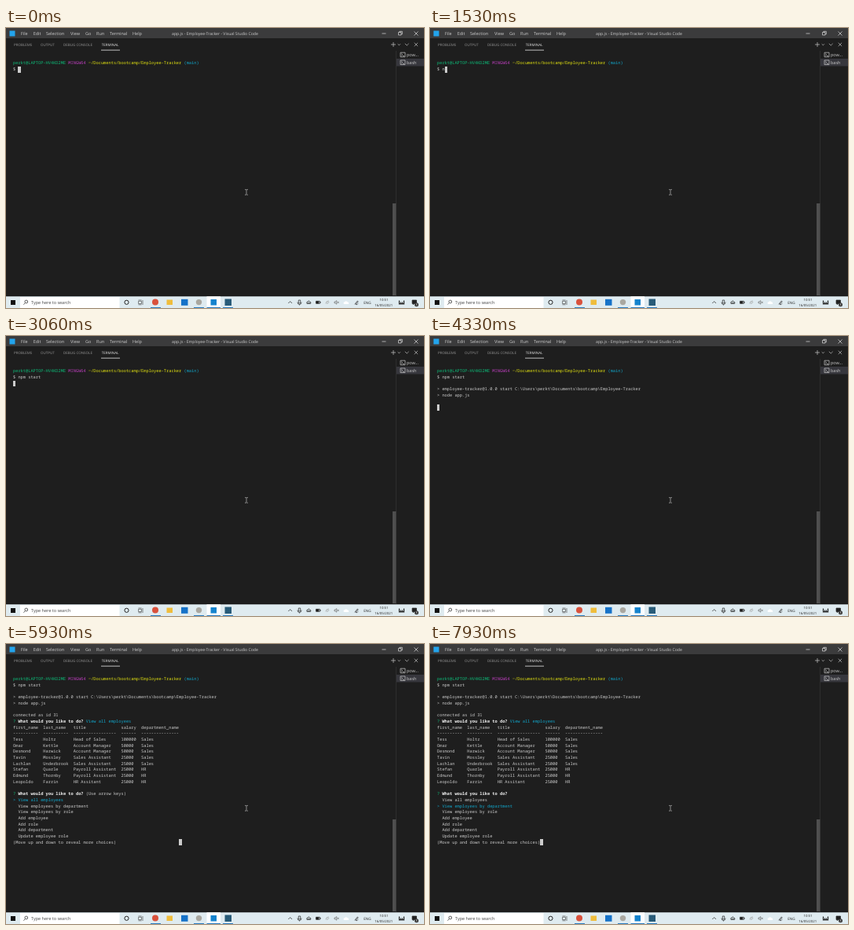
An HTML page for the animation above (8 s loop, 532 by 356 pixels).

```html
<!DOCTYPE html>
<html lang="en">
<head>
<meta charset="utf-8">
<title>Terminal</title>
<style>
html, body { margin: 0; width: 532px; height: 356px; overflow: hidden; background: #1e1e1e; text-rendering: geometricPrecision; }
svg { position: absolute; left: 0; top: 0; font: 5.5px "Open Sans", "Noto Sans", sans-serif; }
pre { position: absolute; left: 9px; top: 41.4px; margin: 0; font: 5.333px/7.667px "Noto Sans Mono", "Liberation Mono", monospace; color: #ccc; }
pre b { color: #f2f2f2; }
.green { color: #0dbc79; }
.purple { color: #bc3fbc; }
.yellow { color: #e5e510; }
.cyan { color: #11a8cd; }
#cursor { position: absolute; width: 3.4px; height: 7.6px; background: #ccc; }
.line { fill: none; stroke-width: .7; }
.tabs { font-size: 4.5px; fill: #969696; }
</style>
</head>
<body>
<svg width="532" height="356" viewBox="0 0 532 356">
  <!-- title bar -->
  <path fill="#3b3b3c" d="M0 0h532v13H0z"/>
  <path fill="#23a4ec" d="M4.5 3.5h7v7h-7z"/>
  <g id="menu" fill="#ccc"></g>
  <text x="266" y="8.9" text-anchor="middle" font-size="5.15" fill="#ccc">app.js - Employee-Tracker - Visual Studio Code</text>
  <path class="line" stroke="#ddd" d="M478.5 7h5M499.5 5.5h3.5v3.5h-3.5zM500.8 5.5v-1.2h3.5v3.5h-1.2M519.5 4.5l5 5m0-5l-5 5"/>
  <!-- panel header -->
  <g id="tabs" class="tabs"></g>
  <path fill="#e7e7e7" d="M121 27.7h24v.8h-24z"/>
  <path class="line" stroke="#c5c5c5" d="M490 21h6M493 18v6M498.7 20.3l1.6 1.6 1.6-1.6M507.8 19.8l2.4 2.4 2.4-2.4M519.7 18.8l4.4 4.4m0-4.4l-4.4 4.4"/>
  <!-- terminal list -->
  <path fill="#37373d" d="M497 39h35v9.6h-35z"/>
  <path fill="#3a3a3a" d="M496.3 29h.6v312h-.6z"/>
  <path fill="#4f4f4f" d="M492 223h4.4v117h-4.4z"/>
  <path class="line" stroke="#ccc" d="M502 31.2h6v5.6h-6zM503.2 32.6l1.5 1.4-1.5 1.4M505 35.6h2M502 41h6v5.6h-6zM503.2 42.4l1.5 1.4-1.5 1.4M505 45.4h2"/>
  <g fill="#ccc"><text x="510" y="36">pow...</text><text x="510" y="45.8">bash</text></g>
  <!-- mouse pointer -->
  <path class="line" stroke="#bbb" d="M304 205.4h1.4l.6.6.6-.6h1.4M306 206v5.5M304 212.1h1.4l.6-.6.6.6h1.4"/>
  <!-- taskbar -->
  <path fill="#dfebf0" d="M0 341.3h532V356H0z"/>
  <path fill="#fff" d="M18 342h126.5v14H18zM255.5 341.3h17.5V356h-17.5z"/>
  <path fill="#111" d="M6 346h6v6H6z"/>
  <g class="line" stroke="#222">
    <circle cx="25.8" cy="348" r="1.9"/><path d="M24.4 349.5l-2 2.2"/>
    <circle cx="153.5" cy="348.8" r="2.6" stroke-width="1"/>
    <path d="M168.5 347.3h4v3.2h-4zM168.5 346h4M168.5 351.8h4M174 346v6" stroke="#555"/>
    <path d="M359.3 350l2.4-2.4 2.4 2.4"/>
    <path d="M372.3 346h2.4v4h-2.4zM371 348.5q0 3 2.5 3t2.5-3M373.5 351.5v1"/>
    <path d="M383 350.5q-1-2.5 1-2.5 1-2.5 2.8 0 2 .5.8 2.5zM383.5 349.2h4"/>
    <path d="M394.5 347.3h5v3h-5zM400.3 348v1.6"/><path fill="#222" d="M395 347.6h3v2.4h-3z"/>
    <path stroke="#999" d="M407 350.5q0-3.5 4-3.5M408.7 351q0-2.3 2.6-2.3"/>
    <path stroke="#666" d="M418 348h1.2l1.6-1.4v4.6l-1.6-1.4H418zM421.8 347.8l1.7 2m0-2l-1.7 2"/>
    <path d="M443.8 351.3l3.5-4.3 1 .8-3.2 3.6q2 1 3-1"/>
    <path stroke-width="1.2" d="M500.5 346.5v5M502.5 348.5v3M504.5 348.5v3M506.5 346.5v5M500.5 350.7h6"/>
    <path fill="#222" d="M517 346h5.5v4.5h-3l-1.2 1.3v-1.3H517z"/>
  </g>
  <path fill="#fff" d="M430 351q-1.2-2.6 1.2-2.7 1.2-2.3 3.2 0 2.7.4 1.5 2.7z"/>
  <circle cx="522.5" cy="351.8" r="2.5" fill="#333"/>
  <text x="522.5" y="353.3" text-anchor="middle" font-size="4" fill="#fff">3</text>
  <!-- plain app markers -->
  <circle cx="190" cy="348.6" r="4" fill="#d9513c"/>
  <path fill="#efbd3c" d="M204.5 345.5h7.5v6.5h-7.5z"/>
  <path fill="#1672c8" d="M223 344.8h8.5v8H223z"/>
  <circle cx="245.5" cy="348.6" r="3.7" fill="#a9a7a0"/>
  <path fill="#1583cd" d="M260.5 345h7.5v7.5h-7.5z"/>
  <path fill="#285b78" d="M278.5 344.5h8.5v8.5h-8.5z"/>
  <path fill="#2b7cc0" d="M184 355h13v1h-13zM239 355h13v1h-13zM255.5 355H273v1h-17.5zM276 355h13v1h-13z"/>
  <g fill="#222">
    <text x="32" y="351" font-size="5.5" fill="#444">Type here to search</text>
    <text x="460" y="350.6" text-anchor="middle" font-size="4.6">ENG</text>
    <g text-anchor="middle" font-size="4.3"><text x="481" y="347.2">10:51</text><text x="480.7" y="353.8">16/05/2021</text></g>
  </g>
</svg>
<pre id="screen"></pre>
<div id="cursor"></div>
<script>
const LOOP = 8000, CHAR = 3.2, ROW = 7.667;
const byId = id => document.getElementById(id);
const paint = (color, text) => `<span class="${color}">${text}</span>`;

function labels(id, y, items) {
  byId(id).innerHTML = items.map(([x, text, fill]) =>
    `<text x="${x}" y="${y}" ${fill ? `fill="${fill}"` : ''}>${text}</text>`).join('');
}
labels('menu', 8.9, [[19, 'File'], [34.7, 'Edit'], [51, 'Selection'], [82, 'View'],
  [101, 'Go'], [115, 'Run'], [132, 'Terminal'], [161, 'Help']]);
labels('tabs', 23.2, [[10, 'PROBLEMS'], [44, 'OUTPUT'], [73, 'DEBUG CONSOLE'], [121.7, 'TERMINAL', '#e7e7e7']]);

const user = 'perkt';
const prompt = [paint('green', user + '@LAPTOP-HV4KD2ME'), paint('purple', 'MINGW64'),
  paint('yellow', '~/Documents/bootcamp/Employee-Tracker'), paint('cyan', '(main)')].join(' ');
const command = 'npm start';
const launch = ['', `&gt; employee-tracker@1.0.0 start C:\\Users\\${user}\\Documents\\bootcamp\\Employee-Tracker`,
  '&gt; node app.js', ''];

const widths = [10, 10, 17, 6, 15];
const table = [
  'first_name,last_name,title,salary,department_name',
  widths.map(n => '-'.repeat(n)).join(),
  'Tess,Holtz,Head of Sales,100000,Sales',
  'Omar,Kettle,Account Manager,50000,Sales',
  'Desmond,Harwick,Account Manager,50000,Sales',
  'Tavin,Mossley,Sales Assistant,25000,Sales',
  'Lachlan,Underbrook,Sales Assistant,25000,Sales',
  'Stefan,Quarle,Payroll Assistant,25000,HR',
  'Edmund,Thornby,Payroll Assistant,25000,HR',
  'Leopoldo,Farrin,HR Assitant,25000,HR'
].map(row => row.split(',').map((cell, i) => cell.padEnd(widths[i])).join('  '));

const choices = ['View all employees', 'View employees by department', 'View employees by role',
  'Add employee', 'Add role', 'Add department', 'Update employee role'];
const ask = extra => `${paint('green', '?')} <b>What would you like to do?</b> ${extra}`;
const menu = (picked, hint) => [ask(hint),
  ...choices.map((text, i) => i === picked ? paint('cyan', '&gt; ' + text) : '  ' + text),
  '(Move up and down to reveal more choices)'];

const keyTimes = [1450, 1600, 1750, 1900, 2130, 2330, 2480, 2600, 2750];
const hint = '(Use arrow keys)';

// Returns the terminal lines and the cursor column on the last line.
function terminal(t) {
  const typed = command.slice(0, keyTimes.filter(k => t >= k).length);
  const lines = [prompt, '$ ' + typed];
  if (t < 3000) return [lines, 2 + typed.length];
  if (t < 3800) return [[...lines, ''], 0];
  lines.push(...launch);
  if (t < 4660) return [[...lines, ''], 0];
  lines.push('connected as id 31');
  if (t < 5600) return [[...lines, ...menu(0, hint)], 66];
  lines.push(ask(paint('cyan', choices[0])), ...table, '');
  return t < 7000 ? [[...lines, ...menu(0, hint)], 66] : [[...lines, ...menu(1, '')], 41];
}

let shown;
function draw() {
  const [lines, col] = terminal(performance.now() % LOOP);
  const html = lines.join('\n');
  if (html !== shown) {
    byId('screen').innerHTML = shown = html;
    byId('cursor').style.left = 9 + col * CHAR + 'px';
    byId('cursor').style.top = 41.3 + (lines.length - 1) * ROW + 'px';
  }
  requestAnimationFrame(draw);
}
draw();
</script>
</body>
</html>
```
